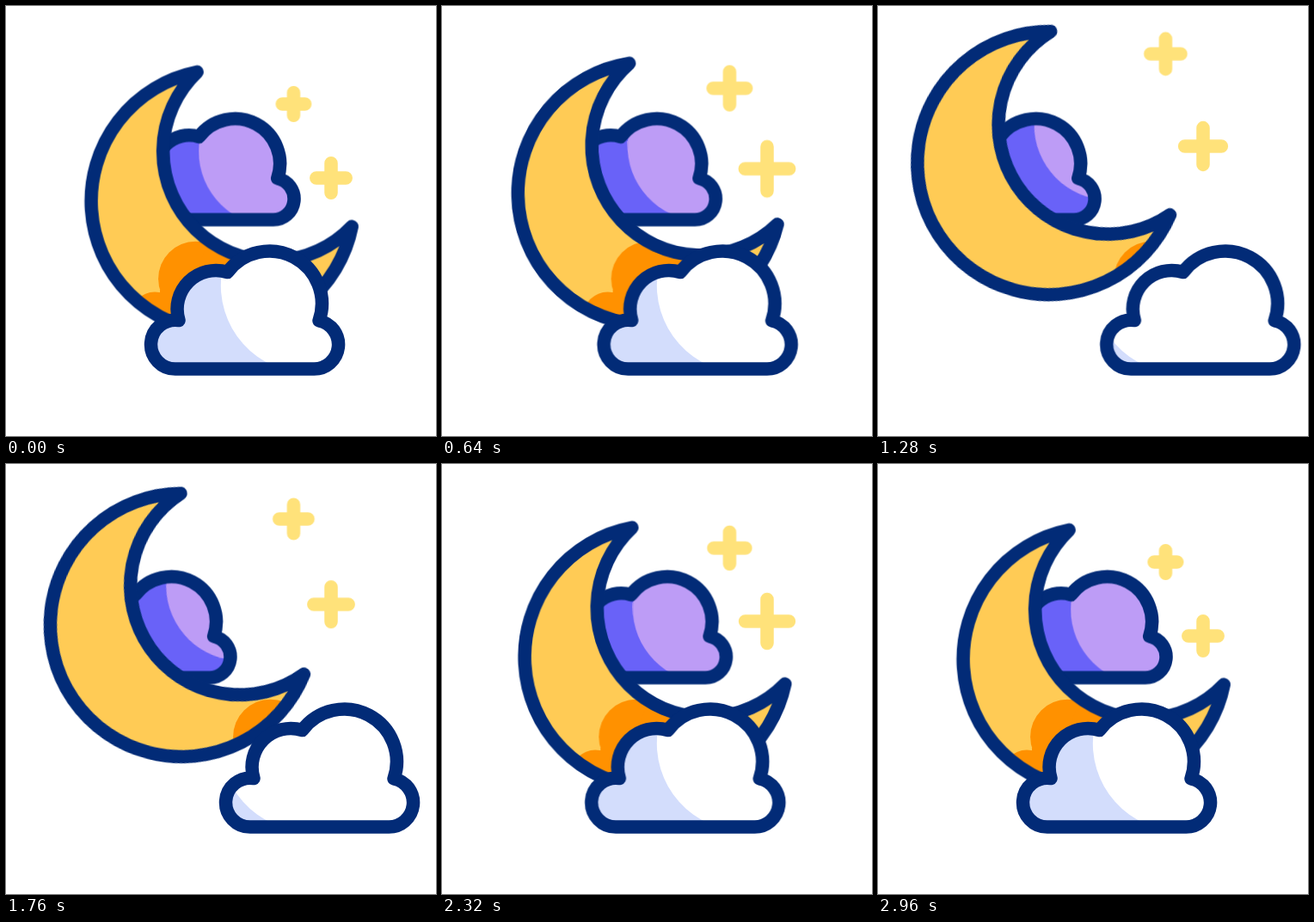
Write an HTML page without scripts that moves like this. It is 500 by 500 pixels and loops after 3 s.

```html
<!DOCTYPE html>
<html lang="en">
<head>
<meta charset="utf-8">
<title>Moon and clouds</title>
<style>
  html, body { margin: 0; width: 100%; height: 100%; overflow: hidden; background: #fff; }
  svg { display: block; width: 100vw; height: 100vh; }

  .line { fill: none; stroke: #022b77; stroke-width: 15.5; stroke-linejoin: round; }
  .back.line { stroke-width: 18.1; }
  .star { fill: none; stroke: #ffe27a; stroke-width: 15.5; stroke-linecap: round; }

  .front, .back, .moon {
    animation: 3s infinite;
    animation-timing-function: cubic-bezier(.667, 0, .333, 1);
  }
  .front { animation-name: front; }
  .back { animation-name: back; }
  .moon { animation-name: moon; }

  @keyframes front {
    0%, 6.333%, 86.5%, 100% { transform: translate(0px, 0px); }
    46.5% { transform: translate(98px, 0px); }
  }
  @keyframes back {
    0%, 6.333%, 86.5%, 100% { transform: translate(3.7px, -113.2px) scale(.857); }
    46.5% { transform: translate(-79.8px, -113.2px) scale(.857); }
  }
  @keyframes moon {
    0%, 6.333%, 86.5%, 100% { transform: translate(251.7px, 226.4px) rotate(0deg); }
    46.5% { transform: translate(198.2px, 181.8px) rotate(12.1deg); }
  }

  .rise1, .rise2, .star { animation: 3s cubic-bezier(.333, 0, .667, 1) infinite; }
  .rise1 { animation-name: rise1; }
  .rise2 { animation-name: rise2; }
  .small { animation-name: small; animation-duration: 1s; }
  .large { animation-name: large; }

  @keyframes rise1 {
    0%, 6.667%, 93.333%, 100% { transform: translate(334.4px, 114px); }
    46.667% { transform: translate(334.4px, 54px); }
  }
  @keyframes rise2 {
    0%, 6.667%, 100% { transform: translate(378px, 200px); }
    50% { transform: translate(378px, 160px); }
  }
  @keyframes small {
    0%, 100% { d: path("M-13.2 0H13.2M0 -13.2V13.2"); }
    50% { d: path("M-20.7 0H20.7M0 -20.7V20.7"); }
  }
  @keyframes large {
    0%, 6.667%, 35.556%, 64.444%, 93.333%, 100% { d: path("M-17.2 0H17.2M0 -17.2V17.2"); }
    21.111%, 50%, 78.889% { d: path("M-25.7 0H25.7M0 -25.7V25.7"); }
  }
</style>
</head>
<body>
<svg viewBox="0 0 500 500">
  <defs>
    <path id="cloud" d="M197.5 422H357.5A28.3 28.3 0 0 0 364 366A61 61 0 0 0 257.5 309.5A45 45 0 0 0 201 365.5A28.4 28.4 0 1 0 197.5 422Z"/>
    <path id="crescent" d="M-29.6 -149.6A153 153 0 1 0 150.4 30.1A127.3 127.3 0 0 1 -31 33.5A127.3 127.3 0 0 1 -29.6 -149.6Z"/>
    <clipPath id="inFront"><use href="#cloud" class="front"/></clipPath>
    <clipPath id="inBack"><use href="#cloud" class="back"/></clipPath>
    <clipPath id="inMoon"><use href="#crescent" class="moon"/></clipPath>
  </defs>

  <!-- purple cloud, lit from inside the crescent -->
  <use href="#cloud" class="back" fill="#6962f8"/>
  <g clip-path="url(#inBack)">
    <g class="moon"><circle cx="59.8" cy="-57.6" r="87.5" fill="#bd9cf6"/></g>
  </g>
  <use href="#cloud" class="back line"/>

  <!-- moon with the shadow of the front cloud -->
  <use href="#crescent" class="moon" fill="#ffcb55"/>
  <g clip-path="url(#inMoon)">
    <g class="front" fill="#ff9100">
      <circle cx="173" cy="361" r="28.5"/>
      <circle cx="220.5" cy="317.2" r="43.4"/>
      <circle cx="282" cy="310" r="57"/>
      <path d="M179 330H282V430H179Z"/>
    </g>
  </g>
  <use href="#crescent" class="moon line"/>

  <!-- front cloud with a still shade -->
  <use href="#cloud" class="front" fill="#fff"/>
  <g clip-path="url(#inFront)">
    <path d="M150 290H256A102 102 0 0 0 332 425V440H150Z" fill="#d3ddfc"/>
  </g>
  <use href="#cloud" class="front line"/>

  <g class="rise1"><path class="star small" d="M-13.2 0H13.2M0 -13.2V13.2"/></g>
  <g class="rise2"><path class="star large" d="M-17.2 0H17.2M0 -17.2V17.2"/></g>
</svg>
</body>
</html>
```
